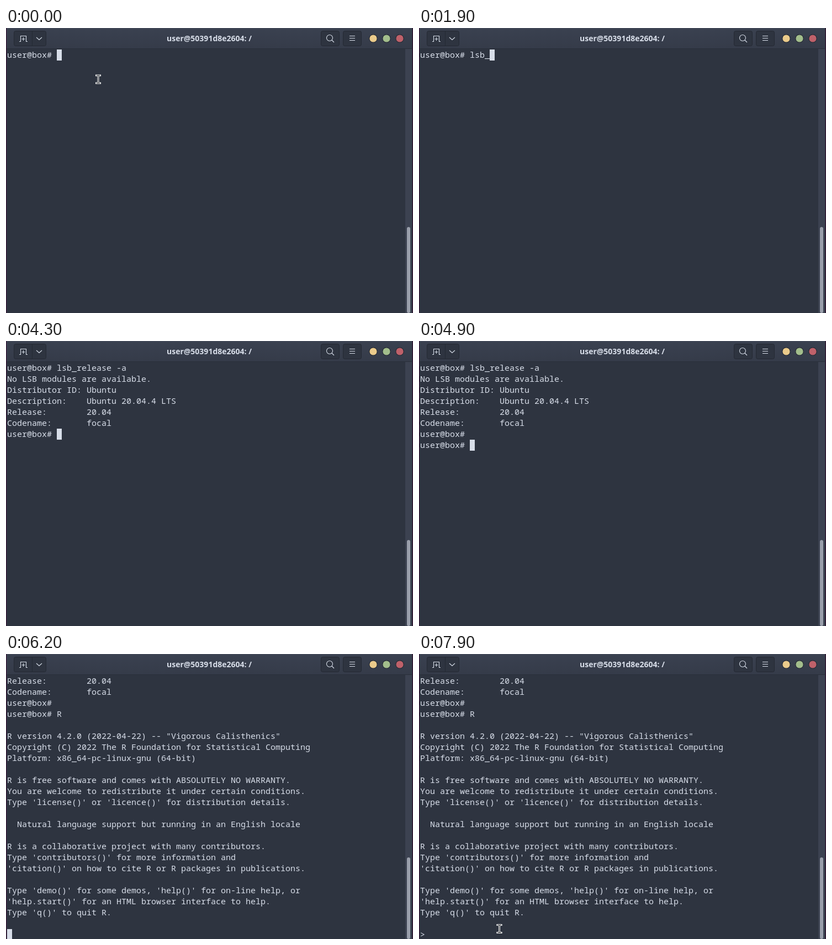
Write an HTML page that moves like this. It is 737 by 517 pixels and loops after 8000 ms.

```html
<!DOCTYPE html>
<html lang="en">
<head>
<meta charset="utf-8">
<title>Terminal</title>
<style>
  html, body { margin: 0; width: 100%; height: 100%; overflow: hidden; background: #2e3440; }
  #stage { position: relative; width: 737px; height: 517px; overflow: hidden; background: #2e3440; }
  svg { position: absolute; left: 0; top: 0; }
  #screen {
    position: absolute; left: 2px; top: 38px; margin: 0;
    font: 15px/20px "Noto Sans Mono", "DejaVu Sans Mono", monospace;
    font-variant-ligatures: none; color: #d8dee9;
  }
  #caret { position: absolute; width: 9px; height: 20px; background: #d8dee9; }
  .title { font: 700 14px "Noto Sans", "Open Sans", sans-serif; fill: #d8dee9; text-anchor: middle; }
  .button { fill: #2e3440; stroke: #242933; }
  .icon { fill: none; stroke: #d8dee9; stroke-width: 1.1; }
  .dots circle { stroke: #272c36; stroke-width: 1.2; }
</style>
</head>
<body>
<div id="stage">
  <svg width="737" height="517" viewBox="0 0 737 517">
    <defs>
      <linearGradient id="bar" x1="0" y1="0" x2="0" y2="1">
        <stop offset="0" stop-color="#3a4150"/>
        <stop offset="1" stop-color="#353b49"/>
      </linearGradient>
    </defs>
    <rect x="723" y="38" width="12" height="479" fill="#3c4251"/>
    <rect id="thumb" x="726" y="361" width="6" height="156" rx="3" fill="#9a9fab"/>
    <rect width="737" height="38" fill="url(#bar)"/>
    <path d="M0 .5H737" stroke="#474e5e"/>
    <path d="M0 37.5H737" stroke="#292e39"/>
    <path d="M.5 0V517M736.5 0V517" stroke="#3b1438"/>
    <path d="M735.5 0V517" stroke="#292e39"/>

    <rect class="button" x="14.5" y="5.5" width="58" height="27" rx="3"/>
    <path d="M47.5 6V32" stroke="#242933"/>
    <rect class="button" x="570.5" y="5.5" width="33" height="27" rx="3"/>
    <rect class="button" x="610.5" y="5.5" width="33" height="27" rx="3"/>
    <g class="icon">
      <path d="M24 24.5H26.5V14.5H36.5V24.5H39M31.5 17V23M28.5 20H34.5"/>
      <path d="M55 17L60 21.5L65 17"/>
      <circle cx="586" cy="18" r="5.5"/>
      <path d="M590 22L594 26M622 14.5H632M622 18.5H632M622 22.5H632"/>
    </g>
    <text class="title" x="368" y="24">user@50391d8e2604: /</text>
    <g class="dots">
      <circle cx="665" cy="19" r="7.2" fill="#ebcb8b"/>
      <circle cx="689" cy="19" r="7.2" fill="#a3be8c"/>
      <circle cx="713" cy="19" r="7.2" fill="#bf616a"/>
    </g>
  </svg>
  <div id="caret"></div>
  <pre id="screen"></pre>
  <svg width="737" height="517" viewBox="0 0 737 517">
    <g id="pointer" fill="none">
      <path d="M-3.5 -7H3.5M-3.5 7H3.5M0 -7V7" stroke="#fff" stroke-width="3" stroke-linecap="square"/>
      <path d="M-3.5 -7H3.5M-3.5 7H3.5M0 -7V7" stroke="#15181d" stroke-width="1"/>
    </g>
  </svg>
</div>
<script>
const LOOP = 8000, ROWS = 24, CELL = 9, LINE = 20, LEFT = 2, TOP = 39;
const byId = id => document.getElementById(id);

const prompt = 'user@box# ';
const listed = `${prompt}lsb_release -a
No LSB modules are available.
Distributor ID: Ubuntu
Description:    Ubuntu 20.04.4 LTS
Release:        20.04
Codename:       focal
${prompt}`;
const started = `${listed}
${prompt}R
`;
const banner = `${started}
R version 4.2.0 (2022-04-22) -- "Vigorous Calisthenics"
Copyright (C) 2022 The R Foundation for Statistical Computing
Platform: x86_64-pc-linux-gnu (64-bit)

R is free software and comes with ABSOLUTELY NO WARRANTY.
You are welcome to redistribute it under certain conditions.
Type 'license()' or 'licence()' for distribution details.

  Natural language support but running in an English locale

R is a collaborative project with many contributors.
Type 'contributors()' for more information and
'citation()' on how to cite R or R packages in publications.

Type 'demo()' for some demos, 'help()' for on-line help, or
'help.start()' for an HTML browser interface to help.
Type 'q()' to quit R.

`;

// [time, text, caret shown]; the caret always follows the text
const typed = (time, text) => [time, prompt + text, true];
const steps = [
  typed(0, ''), [100, prompt, false], typed(700, ''),
  typed(800, 'l'), typed(1000, 'ls'), typed(1400, 'lsb'), typed(1900, 'lsb_'),
  typed(2200, 'lsb_r'), typed(2300, 'lsb_re'), typed(2600, 'lsb_release '),
  typed(3100, 'lsb_release -'), typed(3300, 'lsb_release -a'),
  typed(3800, 'lsb_release -a '), typed(4100, 'lsb_release -a \n'),
  [4300, listed, true], [4700, listed, false], [4800, listed, true],
  [4900, `${listed}\n${prompt}`, true], [5600, `${listed}\n${prompt}R`, true],
  [6000, started, true], [6200, banner, true], [6400, banner + '> ', true],
  [6600, banner + '> ', false], [7200, banner + '> ', true], [7800, banner + '> ', false]
];

// [time, x, y]; no position means hidden
const pointerSteps = [
  [0, 167, 93], [800], [7700, 154, 506], [7800, 149, 501], [7900, 145.5, 498.5]
];

const at = (table, time) => table.findLast(step => step[0] <= time);
let shownStep, shownPointer;

function drawText([, text, caretOn]) {
  const lines = text.split('\n');
  const scroll = Math.max(0, lines.length - ROWS);
  const caret = byId('caret');
  byId('screen').textContent = lines.slice(scroll).join('\n');
  caret.style.left = LEFT + lines.at(-1).length * CELL + 'px';
  caret.style.top = TOP + (lines.length - 1 - scroll) * LINE + 'px';
  caret.style.visibility = caretOn ? 'visible' : 'hidden';
  const thumbTop = 361 + scroll * 2;
  byId('thumb').setAttribute('y', thumbTop);
  byId('thumb').setAttribute('height', 517 - thumbTop);
}

function drawPointer([, x, y]) {
  const pointer = byId('pointer');
  pointer.style.visibility = x === undefined ? 'hidden' : 'visible';
  if (x !== undefined) pointer.setAttribute('transform', `translate(${x} ${y})`);
}

const start = performance.now();
function frame() {
  const time = (performance.now() - start) % LOOP;
  const step = at(steps, time), pointer = at(pointerSteps, time);
  if (step !== shownStep) drawText(shownStep = step);
  if (pointer !== shownPointer) drawPointer(shownPointer = pointer);
  requestAnimationFrame(frame);
}
frame();
</script>
</body>
</html>
```
